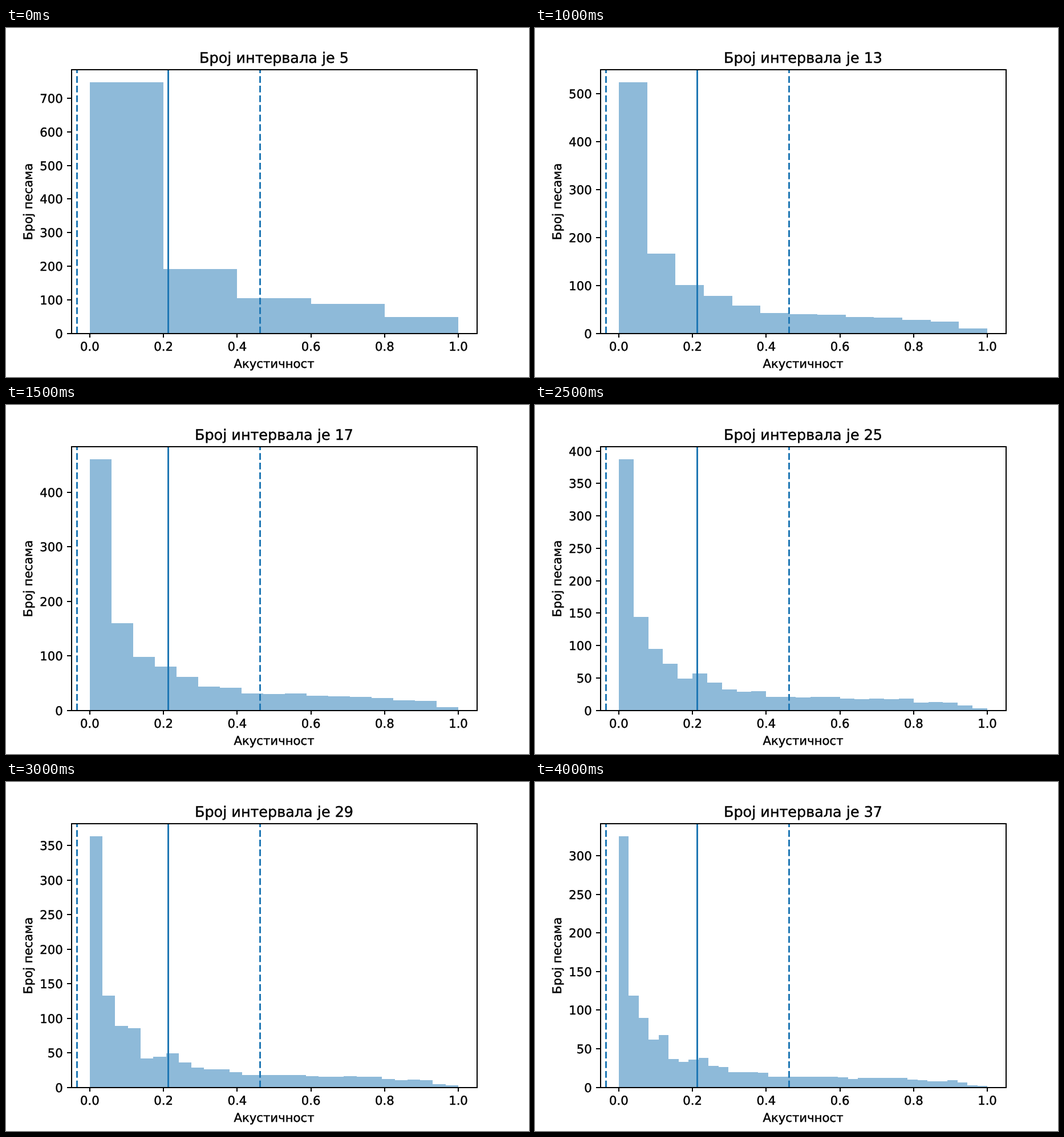
An HTML page for the animation above (4.5 s loop, 917x611 px).

```html
<!DOCTYPE html>
<html>
<head>
<meta charset="utf-8">
<title>Хистограм</title>
<style>
  html, body { margin: 0; width: 100%; height: 100%; overflow: hidden; background: #fff; }
  svg { display: block; width: 917px; height: 611px; }
  text {
    font: 21.22px "DejaVu Sans", sans-serif; text-anchor: middle; text-rendering: geometricPrecision;
    stroke: #000; stroke-width: 0.45;
  }
  .title { font-size: 25.47px; }
  .end { text-anchor: end; }
  .frame { fill: none; stroke: #000; stroke-width: 2; shape-rendering: crispEdges; }
  .mark { stroke: #1f77b4; stroke-width: 3; }
  .dashed { stroke-dasharray: 11.78 5.09; }
  #bars { fill: #8ebad9; shape-rendering: crispEdges; }
</style>
</head>
<body>
<svg viewBox="0 0 917 611">
  <path id="bars"/>
  <g id="marks"></g>
  <g id="xAxis"></g>
  <g id="yAxis"></g>
  <rect class="frame" x="115" y="73" width="711" height="462"/>
  <text id="title" class="title" x="470" y="60.5"></text>
  <text x="470" y="594.5">Акустичност</text>
  <text transform="translate(46 304) rotate(-90)">Број песама</text>
</svg>
<script>
const TOP = 73.3, BOTTOM = 534.6, HEIGHT = BOTTOM - TOP;
const STEP_MS = 500, STEPS = 9;
const MEAN = 0.2125, DEVIATION = 0.2487;

// Key points of the cumulative curve: songs with acousticness below x
const curve = [
  [0, 0], [1 / 37, 325], [1 / 29, 363], [1 / 21, 421], [1 / 13, 524], [1 / 9, 603],
  [4 / 29, 671], [1 / 5, 747], [5 / 21, 802], [2 / 7, 853], [2 / 5, 938],
  [3 / 5, 1042], [4 / 5, 1130], [12 / 13, 1168], [20 / 21, 1174], [1, 1178]
];

function cumulative(x) {
  const i = Math.max(1, curve.findIndex(point => point[0] >= x));
  const [x0, y0] = curve[i - 1], [x1, y1] = curve[i];
  return Math.round(y0 + (y1 - y0) * (x - x0) / (x1 - x0));
}

const histogram = n =>
  Array.from({ length: n }, (_, i) => cumulative((i + 1) / n) - cumulative(i / n));

const el = id => document.getElementById(id);
const px = v => 146.9 + v * 646.1;
const tick = d => `<path class="frame" d="${d}"/>`;

function drawFixed() {
  el('marks').innerHTML = [-1, 0, 1].map(k => {
    const x = Math.round(px(MEAN + k * DEVIATION)) + 0.5;
    return `<path class="mark ${k ? 'dashed' : ''}" d="M${x} ${BOTTOM}V${TOP}"/>`;
  }).join('');
  let axis = '';
  for (let i = 0; i <= 5; i++) {
    const x = px(i / 5);
    axis += tick(`M${Math.round(x)} 535v7`) +
      `<text x="${x}" y="565.2">${(i / 5).toFixed(1)}</text>`;
  }
  el('xAxis').innerHTML = axis;
}

function drawHistogram(n) {
  const counts = histogram(n), limit = counts[0] * 1.05;
  const py = v => BOTTOM - v / limit * HEIGHT;
  el('title').textContent = `Број интервала је ${n}`;
  el('bars').setAttribute('d', `M${px(0)} ${BOTTOM}` +
    counts.map((c, i) => `V${py(c)}H${px((i + 1) / n)}`).join('') + `V${BOTTOM}Z`);
  let axis = '';
  for (let v = 0, step = limit > 450 ? 100 : 50; v < limit; v += step) {
    axis += tick(`M115 ${Math.round(py(v))}h-8`) +
      `<text class="end" x="99.7" y="${py(v) + 8}">${v}</text>`;
  }
  el('yAxis').innerHTML = axis;
}

let shown = -1;
function play() {
  const index = Math.floor(performance.now() / STEP_MS) % STEPS;
  if (index !== shown) drawHistogram(5 + 4 * (shown = index));
  requestAnimationFrame(play);
}

drawFixed();
play();
</script>
</body>
</html>
```
